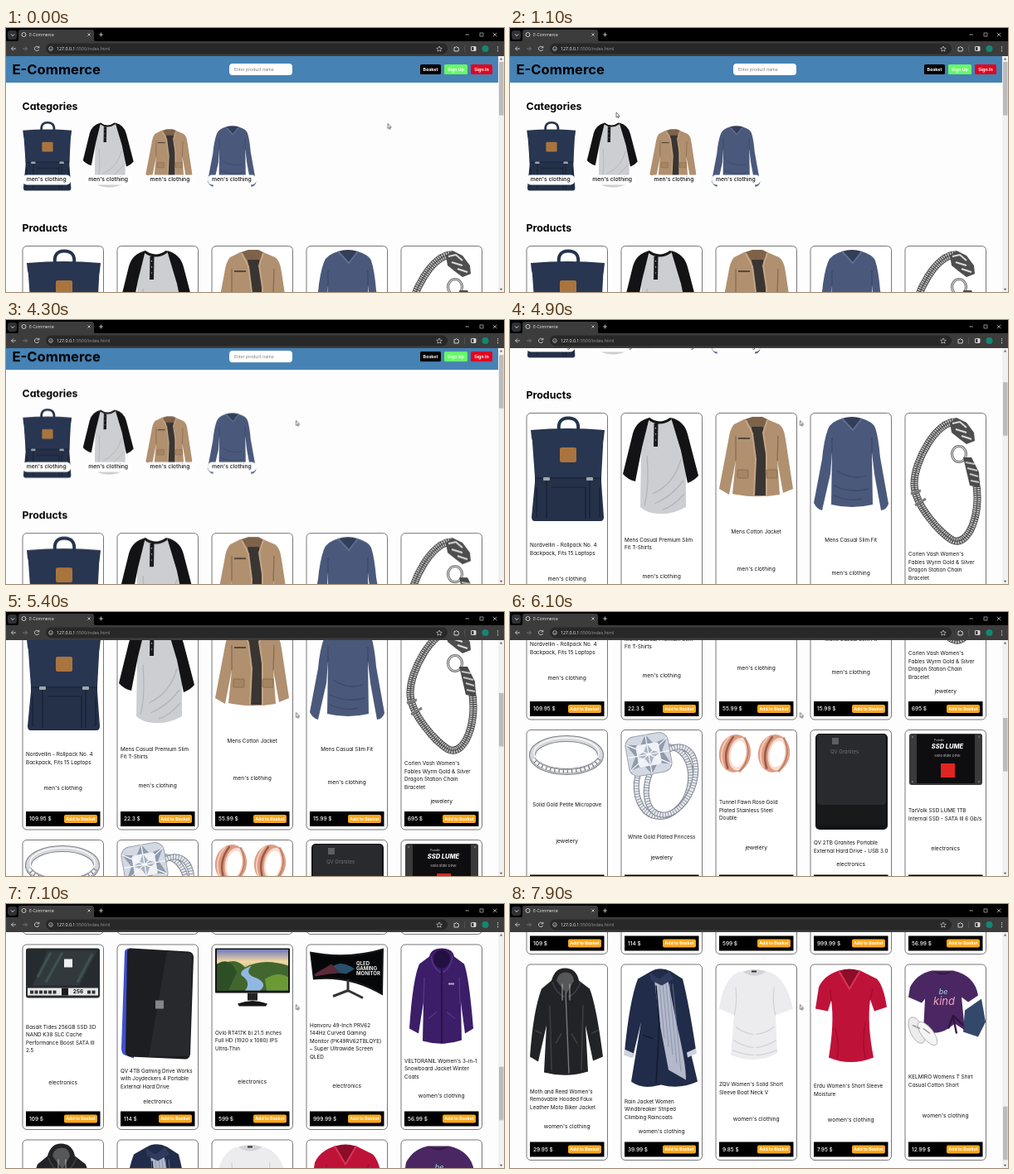
Animation, 600 px wide and 319 px high, one loop 8000 ms. Source, as an HTML page:

```html
<!DOCTYPE html>
<html lang="en">
<head>
<meta charset="utf-8">
<title>E-Commerce</title>
<style>
  html, body { margin: 0; width: 100%; height: 100%; overflow: hidden; background: #fdfdfe; }
  svg { display: block; width: 600px; height: 319px; }
  text { font-family: Inter, sans-serif; font-feature-settings: "cv11"; white-space: pre; }
  .ui { font-family: "Open Sans", sans-serif; }
  .mid { text-anchor: middle; }
</style>
</head>
<body>
<svg id="stage" viewBox="0 0 600 319" xmlns="http://www.w3.org/2000/svg"></svg>
<script>
const LOOP = 8000, STEP = 100;

// drawing helpers
const path = (d, fill, more = '') => `<path d="${d}" fill="${fill}" ${more}/>`;
const line = (d, color, w = 1, more = '') => path(d, 'none', `stroke="${color}" stroke-width="${w}" ${more}`);
const rect = (x, y, w, h, fill, r = 0, more = '') =>
  `<rect x="${x}" y="${y}" width="${w}" height="${h}" rx="${r}" fill="${fill}" ${more}/>`;
const oval = (x, y, rx, ry, fill, more = '') =>
  `<ellipse cx="${x}" cy="${y}" rx="${rx}" ry="${ry}" fill="${fill}" ${more}/>`;
const ring = (x, y, rx, ry, color, w, more = '') =>
  oval(x, y, rx, ry, 'none', `stroke="${color}" stroke-width="${w}" ${more}`);
const text = (x, y, size, s, fill = '#111', more = '') =>
  `<text x="${x}" y="${y + size * 0.36}" font-size="${size}" fill="${fill}" ${more}>${s}</text>`;
const group = (x, y, body, k = 1) => `<g transform="translate(${x} ${y}) scale(${k})">${body}</g>`;
const turn = (deg, x, y, body) => `<g transform="rotate(${deg} ${x} ${y})">${body}</g>`;
const mirror = (x, body) => body + `<g transform="translate(${2 * x} 0) scale(-1 1)">${body}</g>`;

// product pictures, in card coordinates
const tube = x => group(x, 0, turn(10, 22, 29,
  oval(21, 29, 19, 23, '#dc9c84') + oval(26, 29, 12, 20, '#f7ddd1') + oval(25, 29, 9, 16, '#fff') +
  line('M16 9 Q5 29 16 49', '#9c5a45', 2.5) + line('M11 10 Q-1 29 11 48', '#f4c9b6', 2) +
  line('M29 8 Q44 28 30 50', '#c98369', 2.5)));
const pave = (x, y, rx, ry, deg) => turn(deg, x, y,
  ring(x, y, rx, ry, '#808691', 7) + ring(x, y, rx, ry, '#e6e9ee', 5, 'stroke-dasharray="2.5 .8"'));
const chain = d => line(d, '#3c3c3c', 9) + line(d, '#c4c4c4', 7.5, 'stroke-dasharray="1.6 1"') + line(d, '#505050', 1.2);

const art = {
  pack:
    line('M39 22 Q37 6.500 50 6.500 Q64 6.500 62 22', '#24344d', 4) +
    path('M5 21 Q50 17 94 21 L93 30 L90 44 L90 84 L93 126 Q93 131 89 131 H10 Q6 131 6 126 L10 84 L10 44 L6 30Z', '#243149') +
    path('M6 22 Q50 18 93 22 L90 78 H10Z', '#283651') +
    line('M10 79 H90 M30 90 H71 V128', '#162136', 1.2) +
    mirror(50, line('M24 79 V128 M12 90 V126', '#1a263c', 2) + rect(20, 78, 8, 4, '#a3a5a8', 1)) +
    rect(40, 42, 20, 18, '#a9743e', 2),
  raglan:
    path('M34 7 Q47 15 60 7 L72 28 L78 52 L78 114 Q60 124 44 122 Q30 121 23 114 L24 44Z', '#cdced1') +
    line('M31 52 Q34 90 28 112 M72 56 Q64 86 38 98 M75 82 Q60 102 40 110 M76 98 Q62 114 50 117', '#b4b5ba', 1.3) +
    path('M34 6 Q18 10 14 25 L2 74 Q8 81 17 83 L25 42Z', '#131315') +
    path('M60 6 Q76 10 80 26 L93 76 Q88 82 80 85 L72 46Z', '#131315') +
    line('M33 7 Q46 17 60 7', '#151518', 3) + line('M42 13 L41.500 41', '#1a1a1d', 5) +
    line('M41.500 18 V38', '#c8c8c8', 1.2, 'stroke-dasharray="1.2 6"'),
  tan:
    path('M34 8 L22 14 Q17 19 15 34 L4 92 L16 99 L24 58 L20 98 Q46 104 77 99 L74 58 L81 97 L93 92 L84 32 Q82 17 76 14 L62 8Z', '#b0906f') +
    path('M35 8 L44 5 H56 L62 8 L57 22 L44 20Z', '#7e634a') +
    path('M43 17 L57 17 L60 46 L60 100 L46 100 L48 56Z', '#393533') +
    line('M36 9 L44 25 L48 56 L46 100 M62 9 L57 24 L61 50 V100', '#c4a685', 2) +
    line('M24 58 L24 28 M74 58 L75 28', '#85694f', 1.2) + rect(27, 30, 14, 2, '#57493d') +
    [26, 61].map(x => rect(x, 69, 13, 10, '#a58562', 1, 'stroke="#85694f" stroke-width=".8"')).join(''),
  sweater:
    path('M38 7 Q24 11 21 20 Q16 34 14 56 L4 109 Q8 117 14 118 L24 74 L26 48 L25 111 Q50 117 75 111 L74 48 L77 74 L85 118 Q92 117 94 110 L84 54 Q82 30 78 18 Q75 11 62 7Z', '#4a597b') +
    path('M38 7 Q50 3 62 7 L51 20Z', '#333e58') + line('M38 7 L51 21 L62 7', '#5f6e90', 2) +
    line('M26 48 V30 M74 48 V30 M32 70 Q50 82 68 76 M28 88 Q48 98 70 92 M28 100 Q46 108 62 104', '#3b4866', 1.3),
  bracelet:
    chain('M61 11 C38 10 11 58 11 86 C11 112 44 147 57 154 C76 163 93 122 85 82') +
    path('M54 12 L62 6 L74 12 L83 24 L84 34 L74 38 L66 32 L56 24Z', '#4e4e4e') +
    line('M57 13 L66 11 L74 18 M61 20 L74 24 M68 28 L80 32', '#dcdcdc', 2) +
    ring(65, 50, 8.5, 9.5, '#737373', 3.2) + ring(65, 50, 8.5, 9.5, '#d2d2d2', 1.2) +
    path('M70 54 L80 54 L89 72 L90 90 L78 88Z', '#4a4a4a') +
    line('M73 60 L84 62 M75 67 L87 70 M78 74 L88 77 M79 82 L89 84', '#c4c4c4', 2.2) +
    line('M7 98 L19 94 M12 112 L25 104', '#7b7b7b', 3),
  band:
    ring(48, 31, 41, 20, '#80848a', 8) + ring(48, 31, 41, 20, '#d6d8dc', 6) + ring(48, 28, 39, 18, '#f8f8f9', 1.5) +
    line('M8 35 A41 20 0 0 0 88 35', '#74787f', 4.5) +
    line('M8 35 A41 20 0 0 0 88 35', '#f6f7fa', 3.5, 'stroke-dasharray="4 1.2"'),
  diamond:
    pave(51, 63, 32, 43, 14) + pave(60, 62, 27, 43, 22) +
    turn(-10, 33, 30,
      rect(7, 6, 52, 48, '#d3d9e2', 11, 'stroke="#9aa3b2" stroke-width="1"') +
      path('M33 6 L41 18 L58 14 L50 28 L58 46 L42 42 L33 54 L25 42 L8 46 L17 30 L8 14 L25 18Z', '#8f9aab') +
      rect(19, 17, 28, 27, '#eef1f6', 4) +
      path('M33 17 L38 26 L47 30 L38 35 L33 44 L28 35 L19 30 L28 26Z', '#a9b3c2') +
      line('M8 14 L58 46 M58 14 L8 46 M33 6 V54 M8 30 H58', '#fafbfd', 1.2)),
  tubes: tube(2) + tube(49),
  drive:
    rect(6, 5, 87, 116, '#121315', 5) + rect(8, 6, 83, 85, '#292a2d', 4) + path('M8 91 H91 L91 116 H8Z', '#18191b') +
    rect(26, 10, 8, 8, '#5c5e63') + text(24, 27, 6, 'QV Granites', '#707277'),
  ssd:
    rect(5, 5, 88, 62, '#3b3a3b', 3) + rect(14, 6, 70, 59, '#0e0d10') + line('M8 9 H90 M8 63 H90', '#77777a', 1.5, 'stroke-dasharray="2 78"') +
    text(41, 13, 3, 'Portable', '#ddd', 'class="mid"') +
    text(51, 20, 7.5, 'SSD LUME', '#fff', 'class="mid" font-weight="800" font-style="italic"') +
    text(51, 32, 4, 'Solid State Drive', '#ccc', 'class="mid"') + rect(43, 41, 17, 17, '#e02522'),
  ssdDark:
    rect(4, 5, 89, 60, '#262b2f', 3) + path('M30 8 H90 L68 50 H12Z', '#32393d') +
    line('M18 40 L34 10 M28 46 L48 10 M66 46 L84 12', '#3b5354', 3) +
    rect(50, 18, 10, 10, '#f1f1f1') + rect(6, 53, 85, 9, '#e8e8e8') + rect(47, 53, 8, 9, '#1c1c1c') +
    line('M9 58 H42 M78 58 H89', '#333', 4, 'stroke-dasharray="4 1.5"') +
    text(67, 57.5, 6.5, '256', '#111', 'class="mid" font-weight="700"'),
  gameDrive:
    path('M9 9 Q10 5 16 5 L22 7 L20 138 L9 134 Q5 132 5 126Z', '#4150cc') +
    path('M17 5 L86 9 Q92 10 92 16 L88 133 Q87 139 82 139 L16 136 Q10 135 10 130 L12 10 Q12 5 17 5Z', '#1d1e21') +
    path('M60 9 L90 11 L87 135 L38 136Z', '#28292d') + rect(46, 68, 10, 10, '#85868b'),
  monitor:
    rect(4, 5, 90, 54, '#161616', 1) + rect(6, 6.5, 86, 49, 'url(#dusk)') +
    path('M6 30 Q26 12 40 28 Q62 16 92 26 V56 H6Z', '#41672f') +
    path('M6 24 Q22 14 30 34 L20 56 H6Z', '#2d4f26') +
    path('M48 26 Q38 36 54 41 Q68 48 58 56 H40 Q48 46 36 38 Q32 32 48 26Z', '#91b8e2') +
    path('M64 42 Q80 32 92 40 V56 H66Z', '#6b9a35') +
    rect(43, 59, 12, 9, '#222') + path('M31 72 Q49 65 67 72 L65 75 H33Z', '#151515'),
  wide:
    path('M4 9 Q50 18 93 5 L92 62 Q52 38 8 43Z', '#131416') + path('M6 11 Q50 20 91 8 L90 58 Q52 36 9 41Z', '#060708') +
    path('M30 28 Q42 18 58 30 L48 36 Q38 34 30 36Z', '#284f6c') + path('M10 36 L30 24 L40 34 L10 39Z', '#5b2938') +
    ['QLED', 'GAMING', 'MONITOR'].map((s, i) => text(60, 23 + i * 6, 6, s, '#f2f2f2', 'font-weight="700"')).join('') +
    line('M50 43 L50 58 M50 56 L32 63 M50 56 L68 65', '#333', 3),
  parka:
    path('M34 15 Q36 5 49 5 Q62 5 64 15 L76 24 Q82 40 87 102 L77 108 L72 70 L73 116 Q50 124 26 117 L27 70 L21 108 L10 102 Q14 42 22 24Z', '#3c1d68') +
    oval(49, 18, 10, 11, '#221040') + line('M49 28 V120', '#27113f', 1.6) +
    mirror(49, line('M28 40 L27 72 M33 90 L43 82 M36 14 Q38 30 48 34', '#563487', 1.4)) +
    rect(57, 47, 7, 2, '#b8a6d4'),
  biker:
    path('M30 20 Q34 5 46 5 Q60 5 63 20 L76 30 Q84 50 92 112 L80 117 L71 74 L74 130 Q48 138 21 131 L24 74 L14 118 L4 112 Q8 56 18 30Z', '#222326') +
    path('M36 20 Q38 10 47 10 Q56 10 57 20 L48 36Z', '#57575a') + line('M47 34 L51 132', '#77787c', 1.4) +
    mirror(48, line('M31 22 Q36 36 46 40 M28 50 L30 128 M35 96 L42 84 M10 80 L18 84', '#3d3e42', 1.6)) +
    line('M43 24 V44 M52 24 V44', '#ccc', .8),
  raincoat:
    path('M34 10 Q46 2 60 9 L74 18 Q82 50 90 104 L80 110 L74 66 L92 142 Q70 152 48 146 L38 148 Q22 150 12 142 L24 70 L14 112 L4 106 Q10 44 20 18Z', '#202c49') +
    path('M40 20 L56 18 L68 78 Q78 120 78 140 L57 128 L46 70Z', '#b3b9ca') +
    [46, 50, 54, 58, 62].map((x, i) => line(`M${x} 24 L${x + 6 + i} ${90 + i * 10}`, '#7d87a2', .7)).join('') +
    path('M34 10 L46 18 L58 9 L63 18 L49 26 L36 20Z', '#2e3b5c') + line('M26 86 L38 90 M42 26 L46 72 L42 144', '#121a2f', 1.5) +
    path('M4 103 L15 108 L14 114 L3 110Z M79 107 L90 102 L91 108 L80 113Z', '#cdd2de'),
  blouse:
    path('M30 9 Q46 15 62 9 Q84 14 93 54 L72 62 L74 108 Q48 122 18 110 L22 62 L4 54 Q10 14 30 9Z', '#ececef') +
    path('M32 9 Q47 4 61 9 Q46 19 32 9Z', '#d2d2d7') + rect(43, 8, 6, 2, '#333') +
    mirror(47, line('M24 28 Q26 50 22 62 M24 76 Q34 84 46 85 M21 92 Q34 100 46 101 M20 104 Q34 110 46 110', '#cfcfd6', 1.2)),
  vneck:
    path('M34 8 Q16 14 10 28 L6 54 L21 57 L25 44 Q29 70 22 113 Q48 124 76 113 Q68 72 72 43 L77 57 L92 52 Q88 26 80 18 L60 8Z', '#bf1239') +
    path('M35 8 Q47 4 59 8 L47 29Z', '#8d0c29') + line('M34 8 L47 30 L60 8', '#d93558', 2) +
    line('M25 44 L24 30 M72 43 L75 30 M30 78 Q36 100 32 114 M66 70 Q62 96 66 114', '#9c0d2d', 1.2),
  tee:
    path('M72 56 L92 42 L97 70 L88 88 L70 82Z', '#34486c') +
    path('M32 8 Q14 12 6 28 L4 40 L20 47 L24 42 L22 82 Q40 86 52 78 L60 72 L72 80 L68 40 L76 46 L88 38 Q84 14 58 8Z', '#4a2762') +
    path('M33 8 Q46 18 57 8 Q46 13 33 8Z', '#341a47') + line('M58 62 L52 78 M58 62 L70 74 M58 64 L62 84', '#2e143e', 2.2) +
    text(46, 33, 9, 'be', '#9fe0dc', 'class="mid" font-style="italic"') + text(47, 45, 13, 'kind', '#eaa4bd', 'class="mid" font-style="italic"') +
    turn(-24, 14, 80, oval(14, 80, 8, 17, '#ececec', 'stroke="#aaa" stroke-width=".8"')) +
    turn(-38, 27, 84, oval(27, 84, 7, 17, '#f5f5f5', 'stroke="#aaa" stroke-width=".8"')) +
    line('M9 74 L18 78 M22 78 L30 84', '#999', 1.5)
};

const MEN = "men's clothing", WOMEN = "women's clothing", JEWEL = 'jewelery', TECH = 'electronics';

// [card height, [picture, price, category, category y, title y, title lines]...]
const rows = [
  [251,
    ['pack', '109.95', MEN, 201, 160, 'Nordvellin - Rollpack No. 4|Backpack, Fits 15 Laptops'],
    ['raglan', '22.3', MEN, 198, 153.5, 'Mens Casual Premium Slim|Fit T-Shirts'],
    ['tan', '55.99', MEN, 188.5, 144, 'Mens Cotton Jacket'],
    ['sweater', '15.99', MEN, 193.5, 153.5, 'Mens Casual Slim Fit'],
    ['bracelet', '695', JEWEL, 217, 171, "Corlen Vash Women's|Fables Wyrm Gold &amp; Silver|Dragon Station Chain|Bracelet"]],
  [197.5,
    ['band', '168', JEWEL, 135, 91, 'Solid Gold Petite Micropave'],
    ['diamond', '9.99', JEWEL, 155, 130, 'White Gold Plated Princess'],
    ['tubes', '10.99', JEWEL, 143, 88, 'Tunnel Fawn Rose Gold|Plated Stainless Steel|Double'],
    ['drive', '64', TECH, 163, 137, 'QV 2TB Granites Portable|External Hard Drive - USB 3.0'],
    ['ssd', '109', TECH, 144, 98, 'TarVolk SSD LUME 1TB|Internal SSD - SATA III 6 Gb/s']],
  [224,
    ['ssdDark', '109', TECH, 167, 100, 'Basalt Tides 256GB SSD 3D|NAND K38 SLC Cache|Performance Boost SATA III|2.5'],
    ['gameDrive', '114', TECH, 190, 153, 'QV 4TB Gaming Drive Works|with Joydeckers 4 Portable|External Hard Drive'],
    ['monitor', '599', TECH, 166, 107, 'Ovlo RT417K bi 21.5 inches|Full HD (1920 x 1080) IPS|Ultra-Thin'],
    ['wide', '999.99', TECH, 171, 98, 'Hanvoru 49-Inch PRV62|144Hz Curved Gaming|Monitor (PK49RV62TBLQYE)|– Super Ultrawide Screen|QLED'],
    ['parka', '56.99', WOMEN, 183, 141, "VELTORANIL Women's 3-in-1|Snowboard Jacket Winter|Coats"]],
  [237,
    ['biker', '29.95', WOMEN, 196, 154, "Moth and Reed Women's|Removable Hooded Faux|Leather Moto Biker Jacket"],
    ['raincoat', '39.99', WOMEN, 202, 166, 'Rain Jacket Women|Windbreaker Striped|Climbing Raincoats'],
    ['blouse', '9.85', WOMEN, 187, 145.5, "ZQV Women's Solid Short|Sleeve Boat Neck V"],
    ['vneck', '7.95', WOMEN, 188.5, 147.5, "Erdu Women's Short Sleeve|Moisture"],
    ['tee', '12.99', WOMEN, 183, 136.5, 'KELMIRO Womens T Shirt|Casual Cotton Short']]
];

function card(x, y, h, [pic, price, kind, kindY, titleY, title]) {
  const lines = title.split('|'), single = lines.length === 1;
  return group(x, y,
    rect(0, .5, 97.5, h - .5, '#fff', 5, 'stroke="#4a4a4a" stroke-width=".75"') + art[pic] +
    lines.map((s, i) => text(single ? 48.7 : 4, titleY + i * 9.5, 6.35, s, '#111', single ? 'class="mid"' : '')).join('') +
    text(48.7, kindY, 6.7, kind, '#111', 'class="mid"') +
    rect(4, h - 22, 89.5, 18, '#000') + text(8, h - 13, 6.5, price + ' $', '#fff', 'font-weight="500"') +
    rect(50, h - 18, 40, 10, '#fca81c', 2) +
    text(70, h - 13, 5.2, 'Add to Basket', '#fff', 'class="mid" font-weight="700"'));
}

function products() {
  let y = 263, out = '';
  for (const [h, ...items] of rows) {
    items.forEach((item, i) => out += card(20 + 114 * i, y, h, item));
    y += h + 12;
  }
  return out;
}

const button = (x, w, fill, s) =>
  rect(x, 44, w, 12, fill, 1.5) + text(x + w / 2, 50, 5.3, s, '#fff', 'class="mid" font-weight="700"');

const navbar = rect(0, 34, 593, 32, '#4682b4') +
  text(7.5, 50, 16.6, 'E-Commerce', '#000', 'font-weight="700"') +
  rect(269, 43, 76, 14, '#fff', 4) + text(275, 50, 5.1, 'Enter product name', '#777') +
  button(499, 25, '#000', 'Basket') + button(528, 28, '#68f868', 'Sign Up') + button(560, 26, '#e0061f', 'Sign In');

const categories = [['pack', 110, .66], ['raglan', 110.5, .67], ['tan', 119, .63], ['sweater', 115, .65]]
  .map(([pic, y, k], i) => group(17 + 74.4 * i, y, art[pic], k) +
    rect(20 + 74.4 * i, 177.5, 58, 12, '#fff', 5) +
    text(48.7 + 74.4 * i, 183, 6.8, MEN, '#111', 'class="mid" font-weight="500"')).join('');

const heading = (y, s) => text(19.5, y, 12.4, s, '#000', 'font-weight="700"');

const browser = rect(0, 0, 600, 34, '#000') + rect(2, 3, 11, 11, '#303134', 3) +
  line('M6 7.5 L8 9.5 L10 7.5', '#ddd', 1) +
  path('M13 17 Q15 16 15 13 V5 Q15 2 18 2 H103 Q106 2 106 5 V13 Q106 16 108 17Z', '#3c3c3c') +
  rect(0, 16, 600, 18, '#3c3c3c') + rect(48, 18.5, 484, 13, '#282828', 6.5) +
  ring(21.5, 8, 2.5, 2.5, '#ccc', 1) + text(28, 8, 5, 'E-Commerce', '#eee', 'class="ui"') +
  line('M98.5 6.5 L101.5 9.5 M101.5 6.5 L98.5 9.5 M112 8 H117 M114.5 5.5 V10.5', '#ddd', .8) +
  line('M12 25 H6.5 M9 22.5 L6.5 25 L9 27.5', '#ccc', .9) + line('M20 25 H25.5 M23 22.5 L25.5 25 L23 27.5', '#777', .9) +
  line('M39.5 23.5 A2.7 2.7 0 1 0 39.7 26 M39.8 21.8 V24 H37.6', '#ccc', .9) +
  ring(54, 25, 2.3, 2.3, '#ccc', .8) + line('M54 24.8 V26.3', '#ccc', .8) +
  `<text class="ui" x="61" y="27" font-size="5.3" fill="#f2f2f2">127.0.0.1<tspan fill="#999">:5500/index.html</tspan></text>` +
  path('M522 22 L523 24.2 L525.3 24.4 L523.5 26 L524.1 28.2 L522 27 L519.9 28.2 L520.5 26 L518.7 24.4 L521 24.2Z', 'none', 'stroke="#ccc" stroke-width=".7"') +
  path('M540 23.5 H541.5 Q542.5 21 543.5 23.5 H545 V25 Q547 25.8 545 26.6 V28 H540Z', 'none', 'stroke="#ddd" stroke-width=".9"') +
  line('M552.5 21 V29', '#5c5c5c', .7) + rect(560.5, 22.5, 5.5, 5, 'none', .5, 'stroke="#ddd" stroke-width=".9"') +
  rect(563.5, 22.5, 2.5, 5, '#ddd') + oval(577.5, 25, 4, 4, '#128873') +
  line('M592.5 22.3 V28.5', '#ddd', 1.1, 'stroke-dasharray="1.1 1.3"') +
  line('M553.5 8 H558 M586.8 5.8 L591.2 10.2 M591.2 5.8 L586.8 10.2', '#ddd', .7) +
  rect(571, 6, 4, 4, 'none', 0, 'stroke="#ddd" stroke-width=".6"');

document.getElementById('stage').innerHTML = `
  <defs>
    <linearGradient id="dusk" x2="0" y2="1">
      <stop stop-color="#6f78bd"/><stop offset=".3" stop-color="#f4d9a0"/><stop offset="1" stop-color="#41672f"/>
    </linearGradient>
  </defs>
  <rect width="600" height="319" fill="#fdfdfe"/>
  <g id="page">${navbar}${heading(95, 'Categories')}${categories}${heading(242, 'Products')}${products()}</g>
  ${rect(593, 34, 7, 285, '#f1f1f1')}
  ${path('M594.7 38.5 L596.5 36 L598.3 38.5Z M594.7 314.8 L596.5 317.3 L598.3 314.8Z', '#6b6b6b')}
  <g id="thumb">${rect(594, 41, 5.5, 64.5, '#bcbcbc')}</g>
  ${browser}
  <g id="pointer">${path('M0 0 V6 L1.4 4.8 L2.3 6.8 L3.2 6.4 L2.4 4.5 H4.2Z', '#fff', 'stroke="#222" stroke-width=".6"')}</g>`;

// [time, scroll offset], joined by a smooth rising curve
const scroll = [[4200, 0], [4900, 151], [5400, 251], [6100, 384], [7100, 687], [7800, 899]];
// [time, x, y], held until the next entry
const pointer = [[0, 460, 115.5], [900, 385, 113], [1000, 230, 107], [1100, 128, 102], [2900, 123, 103.5],
  [3100, 130, 108], [3500, 165, 118], [3600, 225, 124], [3900, 285, 125], [4000, 330, 123], [4100, 349.5, 121.5]];

const rate = i => (scroll[i + 1][1] - scroll[i][1]) / (scroll[i + 1][0] - scroll[i][0]);
// harmonic mean of the neighbouring rates; at rest on both ends
const speed = i => i === 0 || i === scroll.length - 1 ? 0 : 2 / (1 / rate(i - 1) + 1 / rate(i));

function scrollAt(t) {
  const i = scroll.findIndex(([end]) => t < end) - 1;
  if (i === -1) return 0;
  if (i < 0) return scroll[scroll.length - 1][1];
  const [[t0, y0], [t1, y1]] = scroll.slice(i, i + 2);
  const d = t1 - t0, u = (t - t0) / d, v = 1 - u;
  return y0 + (y1 - y0) * u * u * (3 - 2 * u) + d * u * v * (speed(i) * v - speed(i + 1) * u);
}

// each pose [time, x, y] holds until the next
function play(id, poses) {
  const [, x, y] = poses[poses.length - 1];
  const frames = [...poses, [LOOP, x, y]].map(([t, x, y]) => ({
    offset: t / LOOP, transform: `translate(${x}px, ${y}px)`, easing: 'steps(1)'
  }));
  document.getElementById(id).animate(frames, { duration: LOOP, iterations: Infinity });
}

const times = Array.from({ length: LOOP / STEP }, (_, i) => i * STEP);
play('page', times.map(t => [t, 0, -scrollAt(t)]));
play('thumb', times.map(t => [t, 0, 0.2266 * scrollAt(t)]));
play('pointer', pointer);
</script>
</body>
</html>
```
